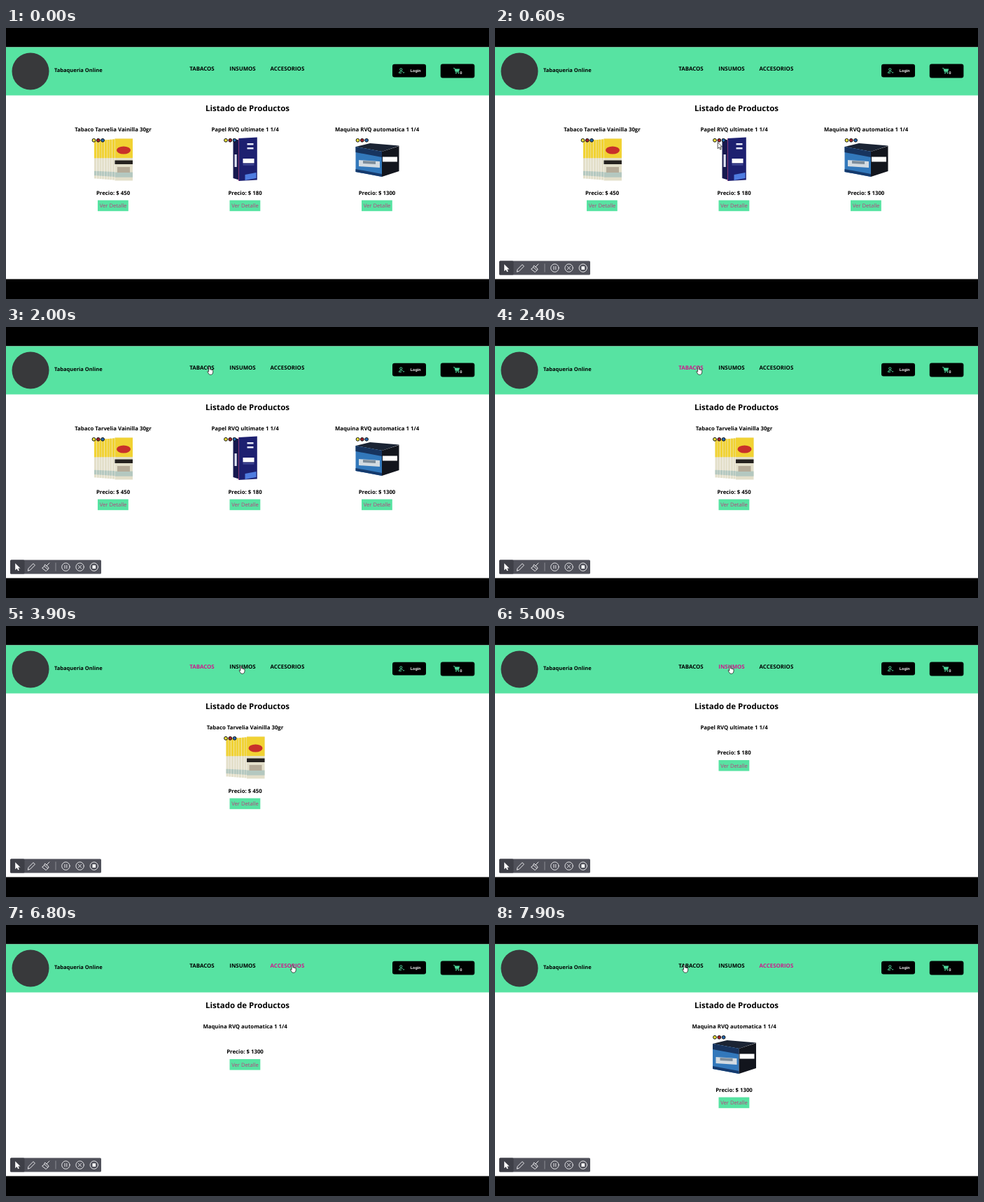
Animation, 690 px wide and 388 px high, one loop 8000 ms. Source, as an HTML page:

```html
<!DOCTYPE html>
<html lang="es">
<head>
<meta charset="utf-8">
<title>Tabaqueria Online</title>
<style>
  html, body { margin: 0; width: 100%; height: 100%; overflow: hidden; background: #000; }
  svg { display: block; width: 100%; height: 100%; }
  text { font: 700 7.8px "Open Sans", "Noto Sans", sans-serif; text-rendering: geometricPrecision; }
  .mid { text-anchor: middle; }
  .title { font-size: 11.5px; }
  .brand { font-size: 7.5px; }
  .nav { font-size: 7.9px; }
  .small { font: 700 5.4px "Liberation Sans", Arial, sans-serif; fill: #fff; }
  .detail { font-weight: 400; font-size: 7.65px; fill: #b8407e; }
  .line { fill: none; stroke: #e9e9ec; stroke-linecap: round; stroke-linejoin: round; }
  .green { fill: none; stroke: #4fd69a; }
  .dot { stroke: #111; }
</style>
</head>
<body>
<svg viewBox="0 0 690 388" preserveAspectRatio="none">
  <rect width="690" height="388" fill="#000"/>
  <rect y="27.5" width="690" height="332" fill="#fff"/>
  <rect y="27.5" width="690" height="69" fill="#57e3a2"/>

  <circle cx="35" cy="62" r="26.5" fill="#38393b"/>
  <text class="brand" x="69" y="62.6">Tabaqueria Online</text>
  <g id="nav"></g>

  <rect x="552" y="51.8" width="48" height="18.6" rx="3"/>
  <circle class="green" cx="564.3" cy="59.4" r="1.6"/>
  <path class="green" d="M565 64.3h-3.7q.4-2.4 3-2.4t2.3.9M567 63.8h2.2"/>
  <text class="small" x="577.8" y="62.9">Login</text>

  <rect x="620.8" y="51.5" width="48.6" height="20" rx="3"/>
  <path class="green" d="M639.2 57.6h1.6l1.6 5.4h5"/>
  <path d="M641 58.4h7.2l-1.2 4h-4.8z" fill="#4fd69a"/>
  <path class="green" stroke-width="1.8" stroke-linecap="round" d="M643 64.6h0M646.6 64.6h0"/>
  <text class="small" x="648.5" y="65.8">0</text>

  <text class="mid title" x="345" y="119.2">Listado de Productos</text>
  <g id="shop"></g>

  <g id="tools">
    <rect x="6" y="333.6" width="130" height="20" rx="1.5" fill="#50515a"/>
    <rect x="6" y="333.6" width="20.5" height="20" rx="1.5" fill="#3e3f47"/>
    <path d="M13.2 338.3v10l2.4-2.2 1.6 3.2 1.7-.8-1.6-3.1h3.2z" fill="#fff"/>
    <path class="line" d="M31.4 348.8l.8-3.3 6.8-6.8 2.4 2.4-6.7 6.8z"/>
    <path class="line" d="M61.9 338l-3.8 4M56 340.4l5.2 4.6-1.4 2-5-4.4zM54.8 342.6l-3.2 2.6 5.6 4.4 2.6-2.6"/>
    <path d="M71 337.5v12" stroke="#8b8c93"/>
    <g id="rings" class="line"></g>
    <path class="line" d="M84 341.4v4.4m2.8 0v-4.4M103.4 341.5l4.2 4.2m0-4.2l-4.2 4.2"/>
    <rect x="123.5" y="341.3" width="4.6" height="4.6" rx=".5" fill="#fff"/>
  </g>

  <g id="cursor" fill="#fff" stroke="#222" stroke-width=".8" stroke-linejoin="round">
    <path id="arrow" d="M0 0v9l2.1-1.9 1.5 3.3 1.5-.7-1.4-3.2h2.7z"/>
    <path id="hand" d="M-.9.9q.9-1.5 1.8 0v3.1l4.3 1v3q0 2.6-2.2 3.4h-2.9q-1.4-1.6-2.9-4.5.2-1.1 1.9.3z"/>
  </g>
</svg>

<script>
const $ = id => document.getElementById(id);
const LOOP = 8000, STEP = 100;
const MIDDLE = 341.5, COLUMN = 188.5;
const LINKS = [
  { label: 'TABACOS', x: 280, half: 18 },
  { label: 'INSUMOS', x: 338, half: 19 },
  { label: 'ACCESORIOS', x: 401.9, half: 25 }
];

const rect = (x, y, w, h, fill) =>
  `<rect x="${x}" y="${y}" width="${w}" height="${h}" fill="${fill}"/>`;
const repeat = (n, make) => Array.from({ length: n }, (_, i) => make(i)).join('');

// An upright face: w wide, h high, its right edge shifted by rise.
const face = (x, y, w, h, rise, fill) =>
  `<path d="M${x} ${y}l${w} ${rise}v${h}l${-w} ${-rise}z" fill="${fill}"/>`;

// Pictures are drawn around x = 0, the centre of their column.
function pouches() {
  const pack = (x, y, w, h) =>
    face(x, y, w, h, 0, '#e3dfca') +
    face(x, y, w, h * .46, 0, '#f1d233') +
    face(x, y + h * .8, w, h * .12, 0, '#b4c8c0');
  return repeat(8, i => pack(-27 + i * 3.7, 161.5 - i * .3, 3.2, 54 + i * .6)) +
    pack(2.5, 158.5, 25.5, 60) +
    '<ellipse cx="15" cy="175" rx="10" ry="5.5" fill="#c8302a"/>' +
    rect(2.5, 189.5, 25.5, 5.5, '#25221f') +
    rect(6, 199, 18, 8, '#b5ab98');
}

function papers() {
  return face(-17, 158, 8, 57, 2.5, '#17184f') +
    face(-9, 158, 26.3, 61, -1.5, '#1d2070') +
    rect(-9.5, 158, 1, 61, '#8b3a78') +
    rect(-15, 181, 3.2, 18, '#dfe2f2') +
    rect(-3, 187, 16, 6.5, '#fff') +
    repeat(2, i => rect(3, 165 + i * 6, 9, 2.5, '#e8eaf8')) +
    rect(-3, 195.5, 16, .7, '#7f8cd0') +
    face(0, 210, 16, 8, -3, '#4f7ce0');
}

function machine() {
  return '<path d="M-30.5 170L-10 165 32 168.5 7 177z" fill="#1b2434"/>' +
    face(-30.5, 170, 37.5, 36, 7, '#3278bb') +
    face(-30.5, 170, 37.5, 8, 7, '#17345f') +
    face(7, 177, 24.5, 36, -8, '#12151d') +
    face(-26, 189, 30, 9, 2, '#d3dbe1') +
    face(-20, 190, 18, 4, 1, '#7d8d9b') +
    face(-30.5, 202, 37.5, 4, 7, '#153a6d') +
    rect(8, 184.5, 21, 7, '#fff');
}

const PRODUCTS = [
  { name: 'Tabaco Tarvelia Vainilla 30gr', price: 450, art: pouches },
  { name: 'Papel RVQ ultimate 1 1/4', price: 180, art: papers },
  { name: 'Maquina RVQ automatica 1 1/4', price: 1300, art: machine }
];

const dots = ['#f2e53a', '#a8242c', '#2468b0'].map((fill, i) =>
  `<circle class="dot" cx="${-27.5 + i * 6.3}" cy="160.8" r="2.4" fill="${fill}"/>`).join('');

$('rings').innerHTML = repeat(3, i => `<circle cx="${85.4 + i * 20.2}" cy="343.6" r="5.7"/>`);

$('nav').innerHTML = LINKS.map(l =>
  `<text class="mid nav" x="${l.x}" y="61.2">${l.label}</text>`).join('');

$('shop').innerHTML = PRODUCTS.map(p => `<g>
  <text class="mid" y="148.3">${p.name}</text>
  <g>${p.art()}${dots}</g>
  <g><text class="mid" y="238.8">Precio: $ ${p.price}</text>
  ${rect(-22, 246.6, 43.8, 15.6, '#57e3a2')}
  <text class="mid detail" y="257.4">Ver Detalle</text></g>
</g>`).join('');

const links = [...$('nav').children];
const cards = [...$('shop').children];

// Pointer moves, each eased from the place before it.
const MOVES = [
  { from: 300, to: 1200, x: 310, y: 128.4 },
  { from: 1200, to: 1700, x: 290.5, y: 56.8 },
  { from: 3300, to: 3900, x: 335.8, y: 56.8 },
  { from: 5400, to: 5800, x: 441, y: 63 },
  { from: 5800, to: 6100, x: 409, y: 56.8 },
  { from: 7600, to: 7900, x: 270.4, y: 56.8 }
];
const CLICKS = [2100, 4800, 6600];
const FILTERS = [2400, 5000, 6800];

const clamp = k => Math.min(1, Math.max(0, k));
const ease = k => k * k * (3 - 2 * k);

function pointer(t) {
  let x = 321, y = 176;
  for (const m of MOVES) {
    const k = ease(clamp((t - m.from) / (m.to - m.from)));
    x += (m.x - x) * k;
    y += (m.y - y) * k;
  }
  return [x, y];
}

// Index of the latest start time that has passed, or -1.
const latest = (t, starts) => starts.filter(s => t >= s).length - 1;
const show = (el, on) => el.style.display = on ? '' : 'none';

function draw(time) {
  const t = Math.floor(time / STEP) * STEP;
  const active = latest(t, CLICKS);
  const filter = latest(t, FILTERS);
  // A picture not filtered to before arrives one step late.
  const loading = filter > 0 && t === FILTERS[filter];

  links.forEach((el, i) => el.style.fill = i === active ? '#cc1b8c' : '');
  cards.forEach((card, i) => {
    const [, picture, foot] = card.children;
    const x = MIDDLE + (filter < 0 ? (i - 1) * COLUMN : 0);
    card.setAttribute('transform', `translate(${x} 0)`);
    foot.setAttribute('transform', `translate(0 ${loading ? -54.6 : 0})`);
    show(card, filter < 0 || filter === i);
    show(picture, !loading);
  });

  const [x, y] = pointer(t);
  const over = y < 66 && LINKS.some(l => Math.abs(x - l.x) <= l.half);
  const started = t >= STEP;
  $('cursor').setAttribute('transform', `translate(${x} ${y})`);
  show($('tools'), started);
  show($('arrow'), started && !over);
  show($('hand'), started && over);
}

const start = performance.now();
function tick() {
  draw((performance.now() - start) % LOOP);
  requestAnimationFrame(tick);
}
tick();
</script>
</body>
</html>
```
